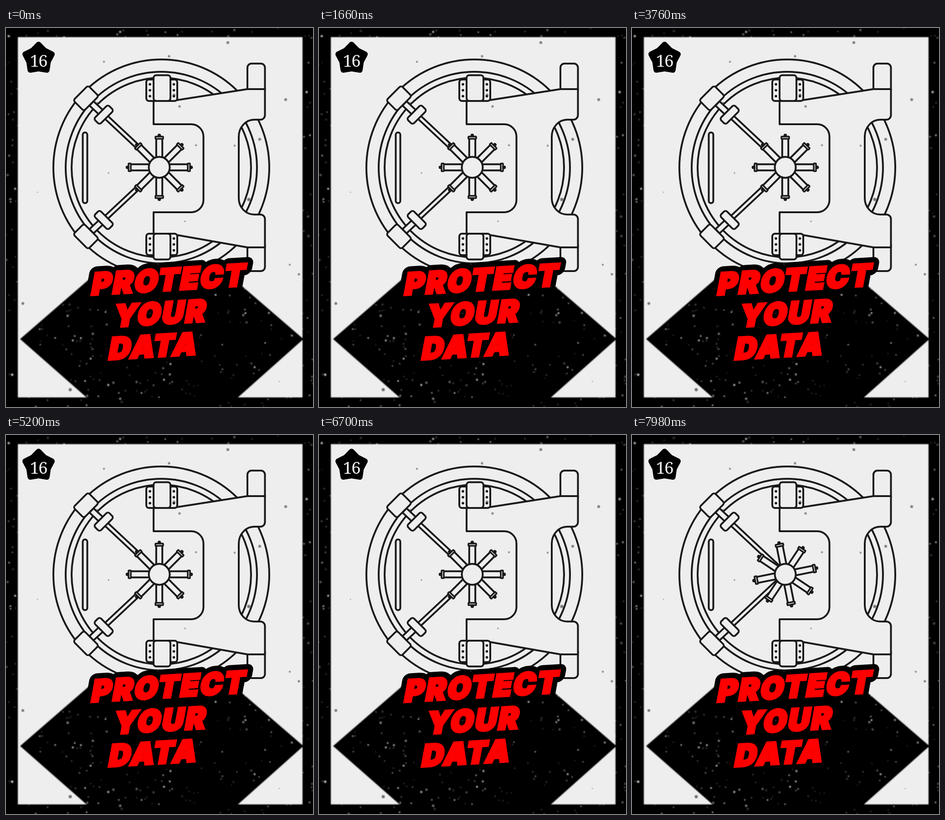
Animation, 674 px wide and 831 px high, one loop 8 s. Source, as an HTML page with a canvas:

```html
<!DOCTYPE html>
<html lang="en">
<head>
<meta charset="utf-8">
<title>Protect your data</title>
<style>
  html, body { margin: 0; width: 100%; height: 100%; overflow: hidden; background: #000; }
  canvas { display: block; width: 674px; height: 831px; }
</style>
</head>
<body>
<canvas id="stage" width="674" height="831"></canvas>
<script>
const ctx = document.getElementById('stage').getContext('2d');
const TAU = Math.PI * 2;
const LOOP = 8000, TURN_START = 7100, TURN_END = 7980;
const PAPER = '#eeeeee', INK = '#191919';
const MID_Y = 305.5;

function seeded(seed) {
  return () => {
    seed = (seed * 1664525 + 1013904223) >>> 0;
    return seed / 4294967296;
  };
}

const specks = [
  [487, 32, 3.5], [215, 74, 2.5], [358, 62, 3], [614, 157, 3.5], [381, 172, 3],
  [557, 244, 3.5], [502, 258, 2.5], [417, 257, 2.5], [225, 318, 2], [393, 424, 2],
  [533, 376, 4], [37, 604, 3.5], [623, 519, 2.5], [643, 540, 3], [141, 793, 4],
  [369, 147, 3.5], [200, 165, 3], [69, 360, 1.5], [600, 775, 1.5]
];

function paint(width = 4) {
  ctx.fillStyle = PAPER;
  ctx.fill();
  ctx.lineWidth = width;
  ctx.strokeStyle = INK;
  ctx.stroke();
}

function box(x, y, w, h, radius = 0, width) {
  ctx.beginPath();
  ctx.roundRect(x, y, w, h, radius);
  paint(width);
}

function ring(x, y, r) {
  ctx.beginPath();
  ctx.arc(x, y, r, 0, TAU);
  paint();
}

function dot(x, y, r, pen = ctx) {
  pen.beginPath();
  pen.arc(x, y, r, 0, TAU);
  pen.fill();
}

function placed(x, y, angle, draw) {
  ctx.save();
  ctx.translate(x, y);
  ctx.rotate(angle);
  draw();
  ctx.restore();
}

// Runs a drawing as it is, then flipped about the vault's horizontal axis.
function mirrored(draw) {
  draw();
  ctx.save();
  ctx.translate(0, MID_Y * 2);
  ctx.scale(1, -1);
  draw();
  ctx.restore();
}

// Card, diamond and stars never change, so they are drawn once.
function makeGround() {
  const layer = document.createElement('canvas');
  layer.width = 674;
  layer.height = 831;
  const pen = layer.getContext('2d');
  pen.fillStyle = '#000';
  pen.fillRect(0, 0, 674, 831);
  pen.fillStyle = PAPER;
  pen.fillRect(26, 20, 625, 790);

  pen.fillStyle = '#000';
  pen.beginPath();
  for (const [x, y] of [[31, 682], [210, 527], [473, 527], [653, 682], [508, 811], [178, 811]]) {
    pen.lineTo(x, y);
  }
  pen.fill();

  const rand = seeded(16);
  pen.fillStyle = PAPER;
  for (let i = 0; i < 850; i++) {
    pen.globalAlpha = 0.2 + rand() ** 2 * 0.75;
    dot(rand() * 674, rand() * 831, 1.2 + rand() ** 2 * 1.5, pen);
  }
  return layer;
}

const ground = makeGround();

function drawGround() {
  ctx.fillStyle = '#000';
  ctx.fillRect(0, 0, 674, 831);
  ctx.filter = 'blur(0.8px)';
  ctx.drawImage(ground, 0, 0);
  ctx.filter = 'none';
}

function drawBadge() {
  ctx.beginPath();
  for (let i = 0; i < 10; i++) {
    const r = i % 2 ? 22 : 31;
    const a = i * TAU / 10 - TAU / 4;
    ctx.lineTo(71.5 + r * Math.cos(a), 67 + r * Math.sin(a));
  }
  ctx.closePath();
  ctx.fillStyle = ctx.strokeStyle = '#000';
  ctx.lineWidth = 12;
  ctx.fill();
  ctx.stroke();
  ctx.fillStyle = PAPER;
  ctx.font = '500 37px "Noto Serif", serif';
  ctx.textAlign = 'center';
  ctx.letterSpacing = '-2px';
  ctx.fillText('16', 71, 85);
}

function drawRings() {
  for (const r of [237, 210, 197]) ring(341, 306, r);
  box(168.5, 229, 10, 155, 5);
}

function drawRod() {
  const angle = Math.atan2(115, 123);
  placed(214, 190, angle, () => {
    box(0, -4.5, 168, 9);
    box(-36, -6.5, 36, 13);
  });
  placed(214.5, 190, TAU / 8, () => box(-9, -22, 18, 44, 5));
  placed(175.5, 154, TAU / 8, () => box(-16.5, -23, 33, 46, 5));
}

function drawFrame() {
  mirrored(() => box(530, 78, 38.5, 58, [9, 9, 0, 0]));

  // Bracket outline, clockwise from the upper left hinge.
  ctx.beginPath();
  ctx.moveTo(324, 159);
  ctx.lineTo(376, 158);
  ctx.lineTo(530, 134);
  ctx.lineTo(568.5, 134);
  ctx.arcTo(568.5, 201, 545, 201, 10);
  ctx.lineTo(545, 201);
  ctx.bezierCurveTo(526, 201, 511, 218, 511, 238);
  ctx.lineTo(511, 373);
  ctx.bezierCurveTo(511, 393, 526, 409, 545, 409);
  ctx.arcTo(568.5, 409, 568.5, 481, 10);
  ctx.lineTo(568.5, 481);
  ctx.lineTo(530, 481);
  ctx.lineTo(376, 454);
  ctx.lineTo(324, 452);
  ctx.lineTo(324, 404);
  ctx.arcTo(433.5, 404, 433.5, 211, 27);
  ctx.arcTo(433.5, 211, 324, 211, 27);
  ctx.lineTo(324, 211);
  ctx.closePath();
  paint();

  mirrored(() => {
    box(308, 113, 68, 47, 6);
    box(324, 103.5, 37, 56.5, 6);
    ctx.fillStyle = INK;
    for (const x of [316, 368.5]) {
      for (const y of [123.5, 136.5, 149.5]) dot(x, y, 2.8);
    }
  });
}

function drawWheel(angle) {
  placed(336.5, 305.5, angle, () => {
    for (let i = 0; i < 8; i++) {
      placed(0, 0, i * TAU / 8, () => {
        box(18, -6.7, 46, 13.4);
        box(62.5, -8.5, 5, 17, 1, 3.5);
        ctx.fillStyle = INK;
        dot(70, 0, 3.8);
      });
    }
    ring(0, 0, 23);
  });
}

function drawSpecks() {
  ctx.fillStyle = '#333';
  for (const [x, y, r] of specks) {
    ctx.globalAlpha = 0.1 + r * 0.08;
    dot(x, y, r);
    dot(x, y, r * 0.6);
  }
  ctx.globalAlpha = 1;
}

function drawTitle() {
  const lines = [['PROTECT', 355, 575], ['YOUR', 336.5, 649], ['DATA', 321, 721]];
  ctx.font = '900 65px Inter, sans-serif';
  ctx.textAlign = 'center';
  ctx.letterSpacing = '4px';
  const slanted = draw => {
    for (const [word, x, y] of lines) {
      placed(x, y, -0.061, () => {
        ctx.transform(1, 0, -0.25, 1, 0, 0);
        draw(word);
      });
    }
  };
  ctx.strokeStyle = '#000';
  ctx.lineWidth = 29;
  slanted(word => ctx.strokeText(word, 0, 0));

  // A stroke in the fill colour thickens the letters.
  ctx.fillStyle = ctx.strokeStyle = '#ff0000';
  ctx.lineWidth = 6;
  ctx.lineJoin = 'miter';
  ctx.miterLimit = 3;
  slanted(word => {
    ctx.fillText(word, 0, 0);
    ctx.strokeText(word, 0, 0);
  });
}

// Pictures hold in a repeating rhythm of 20, 100 and 20 ms.
function stepTime(t) {
  const beat = t % 140;
  return t - beat + (beat < 20 ? 0 : beat < 120 ? 20 : 120);
}

function wheelAngle(t) {
  const p = Math.min(1, Math.max(0, (t - TURN_START) / (TURN_END - TURN_START)));
  return -TAU / 32 * p * p;
}

function render(now) {
  const t = stepTime(now % LOOP);
  ctx.lineJoin = 'round';
  drawGround();
  drawBadge();
  drawRings();
  mirrored(drawRod);
  drawFrame();
  drawWheel(wheelAngle(t));
  drawSpecks();
  drawTitle();
}

const start = performance.now();
function tick() {
  render(performance.now() - start);
  requestAnimationFrame(tick);
}
tick();
</script>
</body>
</html>
```
